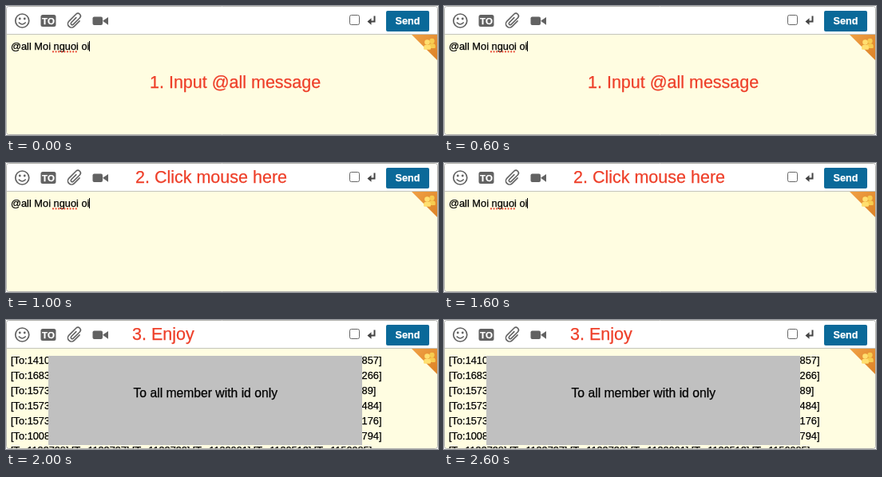
Recreate the animation shown at these times as an HTML page with a canvas. Size 541 px wide and 162 px high, loop 3 s.

```html
<!DOCTYPE html>
<html lang="en">
<head>
<meta charset="utf-8">
<style>
  html, body { margin: 0; width: 100%; height: 100%; overflow: hidden; background: #fff; }
  canvas { display: block; }
</style>
</head>
<body>
<canvas id="stage" width="541" height="162"></canvas>
<script>
const ctx = document.getElementById('stage').getContext('2d');
const SANS = '"Liberation Sans", Arial, sans-serif';
const GRAY = '#626262';
const RED = '#ee3f29';
const STEP = 1000;

// A hairline outline gives the slightly heavy look of smoothed text.
function text(str, x, y, size, color, weight = '', align = 'left') {
  ctx.font = `${weight} ${size}px ${SANS}`;
  ctx.textAlign = align;
  ctx.fillStyle = ctx.strokeStyle = color;
  ctx.lineWidth = 0.25;
  ctx.fillText(str, x, y);
  ctx.strokeText(str, x, y);
}

function box(x, y, w, h, r, fill, stroke) {
  ctx.beginPath();
  ctx.roundRect(x, y, w, h, r);
  if (fill) { ctx.fillStyle = fill; ctx.fill(); }
  if (stroke) { ctx.strokeStyle = stroke; ctx.lineWidth = 1; ctx.stroke(); }
}

function disc(x, y, r, color) {
  ctx.beginPath();
  ctx.arc(x, y, r, 0, Math.PI * 2);
  ctx.fillStyle = color;
  ctx.fill();
}

function shape(path, color, lineWidth) {
  const p = new Path2D(path);
  if (lineWidth) {
    ctx.strokeStyle = color;
    ctx.lineWidth = lineWidth;
    ctx.stroke(p);
  } else {
    ctx.fillStyle = color;
    ctx.fill(p);
  }
}

function smiley() {
  ctx.beginPath();
  ctx.arc(20.3, 18.5, 8.5, 0, Math.PI * 2);
  ctx.strokeStyle = GRAY;
  ctx.lineWidth = 1.7;
  ctx.stroke();
  disc(17.3, 16, 1.4, GRAY);
  disc(23.3, 16, 1.4, GRAY);
  shape('M15.8 20.5 Q20.3 25.3 24.8 20.5', GRAY, 1.5);
}

function paperclip() {
  ctx.save();
  ctx.translate(86, 18.5);
  ctx.rotate(Math.PI / 4);
  ctx.lineCap = 'round';
  shape('M4.6 -4 V5.5 A4.6 4.6 0 0 1 -4.6 5.5 V-7 A3.3 3.3 0 0 1 2 -7 V4.6 A1.7 1.7 0 0 1 -1.4 4.6 V-4', GRAY, 1.6);
  ctx.restore();
}

function toolbar() {
  smiley();
  box(43.5, 11, 19, 15, 2.5, GRAY);
  text('TO', 53, 22.6, 11.5, '#fff', 'bold', 'center');
  paperclip();
  box(108.5, 13.5, 12.5, 10.5, 2, GRAY);
  shape('M121 18.7 L128 14 V23.8Z', GRAY);
  box(430.5, 11.5, 12, 12, 2, '#fff', '#666');
  shape('M461.5 12.5 V19.5 H455', '#444', 2);
  shape('M452.5 19.5 L457.5 15.3 V23.7Z', '#444');
  box(476, 6, 54, 26, 2, '#0a6999');
  text('Send', 503, 23.3, 12.6, '#fff', 'bold', 'center');
}

function person(x, y, s, color) {
  disc(x, y, 3 * s, color);
  box(x - 4 * s, y + 3 * s, 8 * s, 5.5 * s, [3 * s, 3 * s, 1, 1], color);
}

function corner() {
  const g = ctx.createLinearGradient(510, 36, 541, 66);
  g.addColorStop(0, '#f0a044');
  g.addColorStop(1, '#dc8226');
  shape('M508 36 H540 V68Z', g);
  person(533.5, 44, 1.05, '#f8cc50');
  person(527.5, 45.5, 1.1, '#ffdf70');
}

function panel() {
  ctx.fillStyle = '#fff';
  ctx.fillRect(0, 0, 541, 162);
  ctx.fillStyle = '#fffde1';
  ctx.fillRect(1, 36, 539, 125);
  ctx.fillStyle = '#c4c4bc';
  ctx.fillRect(1, 35, 539, 1);
  toolbar();
}

function draft() {
  text('@all Moi nguoi oi', 6, 55, 12.8, '#000');
  for (let x = 59; x < 91; x += 3.6) disc(x, 57.4, 1.05, '#e8432e');
  ctx.fillStyle = '#000';
  ctx.fillRect(104, 44, 1, 13);
}

const ROWS = [
  ['1410', '857'], ['1683', '266'], ['1573', '89'],
  ['1573', '484'], ['1573', '176'], ['1008', '794']
];
const LAST_ROW = [1133728, 1133737, 1133730, 1132091, 1130512, 1150985];

function recipients() {
  ROWS.forEach(([start, end], i) => {
    const y = 55 + i * 19;
    text(`[To:${start}`, 6, y, 12.8, '#000');
    text(`${end}]`, 445.6, y, 12.8, '#000');
  });
  text(LAST_ROW.map(id => `[To:${id}]`).join(' '), 6, 168, 12.7, '#000');
  ctx.fillStyle = '#c0c0c0';
  ctx.fillRect(53, 45, 393, 112);
  text('To all member with id only', 159.5, 97, 15.7, '#000');
}

const SCENES = [
  { title: '1. Input @all message', x: 180, y: 103, body: draft },
  { title: '2. Click mouse here', x: 162, y: 25, body: draft },
  { title: '3. Enjoy', x: 158, y: 25, body: recipients }
];

function render(now) {
  const scene = SCENES[Math.floor(now / STEP) % SCENES.length];
  panel();
  scene.body();
  corner();
  text(scene.title, scene.x, scene.y, 21.5, RED);
  box(0.5, 0.5, 540, 161, 3, null, '#b4b4b0');
}

const startTime = performance.now();
function tick() {
  render(performance.now() - startTime);
  requestAnimationFrame(tick);
}
tick();
</script>
</body>
</html>
```
